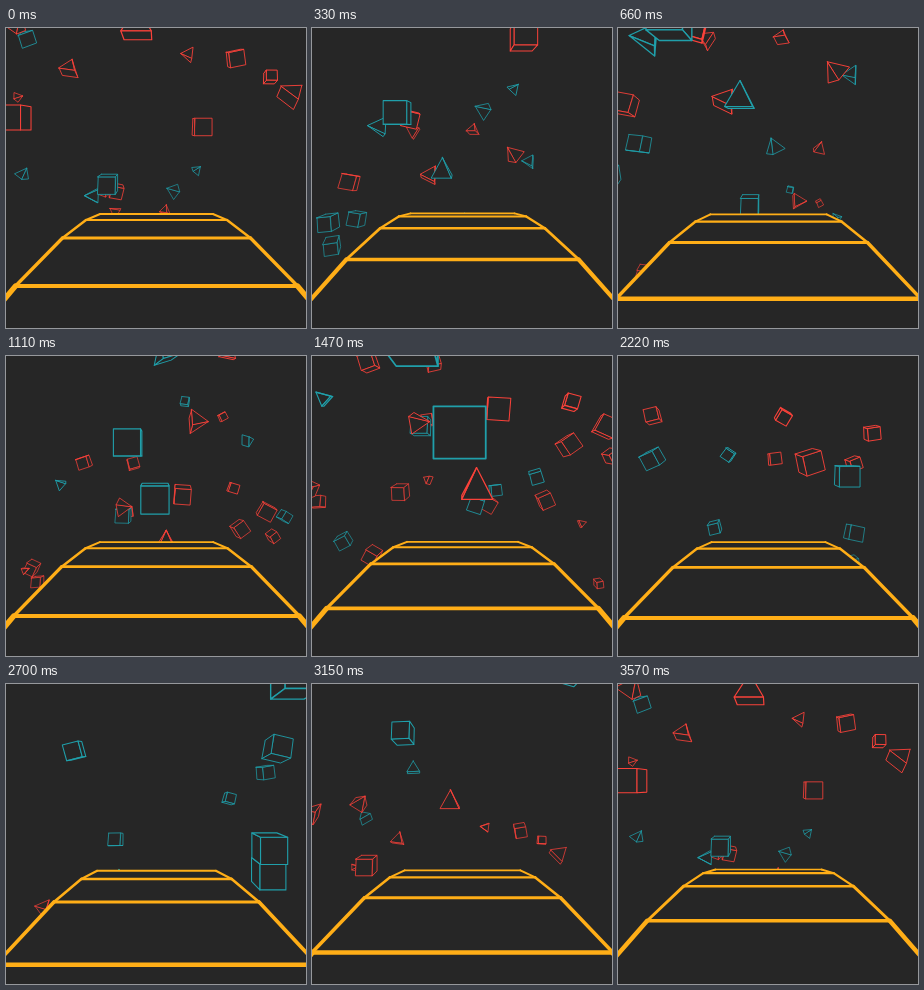
These frames come from a looping animation (300x300 px, 3.6 s). An HTML page with a canvas:

```html
<!DOCTYPE html>
<html lang="en">
<head>
<meta charset="utf-8">
<style>
html, body { margin: 0; height: 100%; overflow: hidden; background: #262626; }
canvas { display: block; }
</style>
</head>
<body>
<canvas id="stage" width="300" height="300"></canvas>
<script>
const ctx = document.getElementById('stage').getContext('2d');
const BG = '#262626', RED = '#fa423a', TEAL = '#209faa', ORANGE = '#ffae17';
const LOOP = 3600, STEP = 30, RUNGS = 39, CX = 150.5, CY = 54, EYE = 100;

// Solids: vertices and faces wound clockwise as seen from outside.
const cube = {
  points: [...Array(8).keys()].map(i => [(i & 1) - .5, (i >> 1 & 1) - .5, (i >> 2) - .5]),
  faces: [[0, 1, 3, 2], [5, 4, 6, 7], [4, 0, 2, 6], [1, 5, 7, 3], [4, 5, 1, 0], [2, 3, 7, 6]]
};
const pyramid = {
  points: [[-.5, .5, -.5], [.5, .5, -.5], [.5, .5, .5], [-.5, .5, .5], [0, -.5, 0]],
  faces: [[4, 1, 0], [4, 2, 1], [4, 3, 2], [4, 0, 3], [0, 1, 2, 3]]
};

// The ground falls away with distance, measured in rungs.
const bend = z => 12 * z + .002 * z ** 3;
const lineWidth = z => .3 + 7.5 / z;
const travelled = t => RUNGS * t / LOOP;
const wrap = (v, size) => (v % size + size) % size;

let seed = 11;
function random(min = 0, max = 1) {
  seed = (seed * 1664525 + 1013904223) % 4294967296;
  return min + (max - min) * seed / 4294967296;
}

function turn(p, a, b, angle) {
  const c = Math.cos(angle), s = Math.sin(angle), q = [...p];
  q[a] = p[a] * c - p[b] * s;
  q[b] = p[a] * s + p[b] * c;
  return q;
}

// x, y and size are as they look on the stage at distance z.
const solids = [];
function add(shape, color, start, z, x, y, size, yaw = 0, pitch = 0, roll = 0) {
  solids.push({
    color, start, faces: shape.faces, width: size * z,
    x: (x - CX) * z, y: (y - CY - bend(z)) * z,
    points: shape.points.map(p => turn(turn(turn(p, 0, 2, yaw), 1, 2, pitch), 0, 1, roll))
  });
}

// Fills a stretch of the track with small solids.
function scatter(count, from, to, pyramids, reds, spin) {
  for (let i = 0; i < count; i++) {
    const shape = random() < pyramids ? pyramid : cube;
    const tilt = shape === cube ? .25 : .5, roll = shape === cube ? spin : 1.6;
    add(shape, random() < reds ? RED : TEAL, from + (to - from) * (i + random()) / count, 16,
      CX + random(-170, 170), random(40, 190), random(7, 16),
      random(-tilt, tilt), random(-tilt, tilt), random(-roll, roll));
  }
}
scatter(32, 10, 27, .6, .5, .3);
scatter(36, 27, 38, .15, .65, .6);
scatter(6, 38, 47, 0, .5, .4);

// The larger solids, where they are seen at a given time.
function landmark(time, shape, color, x, y, size) {
  const z = 240 / size;
  add(shape, color, z + travelled(time), z, x, y, size);
}
landmark(0, cube, RED, 8, 90, 24);
landmark(0, cube, RED, 196, 99, 17);
landmark(0, cube, TEAL, 102, 156, 17);
landmark(0, pyramid, RED, 131, -7, 29);
landmark(660, cube, TEAL, 132, 177, 17);
landmark(660, pyramid, TEAL, 122, 66, 27);
landmark(1110, cube, TEAL, 149, 142, 27);
landmark(1110, pyramid, RED, 160, 184, 20);
landmark(2220, cube, TEAL, 229, 120, 20);
landmark(2700, cube, TEAL, 263, 164, 26);
landmark(2700, cube, TEAL, 262, 189, 25);

function trace(points) {
  ctx.beginPath();
  points.forEach(p => ctx.lineTo(...p));
}

function drawSolid(solid, z) {
  const middle = solid.y / z + CY + bend(z);
  const seen = [];
  for (const [px, py, pz] of solid.points) {
    const depth = z + pz * solid.width / 300;
    if (depth < .15) return;
    seen.push([
      CX + (solid.x + px * solid.width) / depth,
      EYE + ((middle - EYE) * z + py * solid.width) / depth
    ]);
  }
  ctx.strokeStyle = solid.color;
  ctx.lineWidth = lineWidth(z);
  for (const face of solid.faces) {
    const corners = face.map(i => seen[i]), [a, b, c] = corners;
    const facesAway = (b[0] - a[0]) * (c[1] - a[1]) <= (b[1] - a[1]) * (c[0] - a[0]);
    if (facesAway) continue;
    trace(corners);
    ctx.closePath();
    ctx.fill();
    ctx.stroke();
  }
}

function drawRoad(phase) {
  const rungs = [];
  for (let z = phase < .5 ? phase + 1 : phase; z < 5.55; z++) {
    const y = CY + 360 / z + 12 * z, half = 282 / z;
    rungs.push({ z, left: [CX - half, y], right: [CX + half, y] });
  }
  trace([...rungs.map(r => r.left), ...rungs.map(r => r.right).reverse()]);
  ctx.fill();
  ctx.strokeStyle = ORANGE;
  rungs.forEach((rung, i) => {
    ctx.lineWidth = lineWidth(rung.z);
    trace([rung.left, rung.right]);
    ctx.stroke();
    const next = rungs[i + 1];
    if (!next) return;
    ctx.lineWidth = lineWidth((rung.z + next.z) / 2);
    for (const side of ['left', 'right']) {
      trace([rung[side], next[side]]);
      ctx.stroke();
    }
  });
}

function draw() {
  const shift = travelled(Math.floor(performance.now() % LOOP / STEP) * STEP);
  ctx.fillStyle = BG;
  ctx.fillRect(0, 0, 300, 300);
  ctx.lineJoin = ctx.lineCap = 'round';
  solids
    .map(solid => [solid, wrap(solid.start - shift - .5, RUNGS) + .5])
    .filter(([, z]) => z < 32)
    .sort((a, b) => b[1] - a[1])
    .forEach(([solid, z]) => drawSolid(solid, z));
  drawRoad(wrap(-shift, 1));
  requestAnimationFrame(draw);
}
draw();
</script>
</body>
</html>
```
